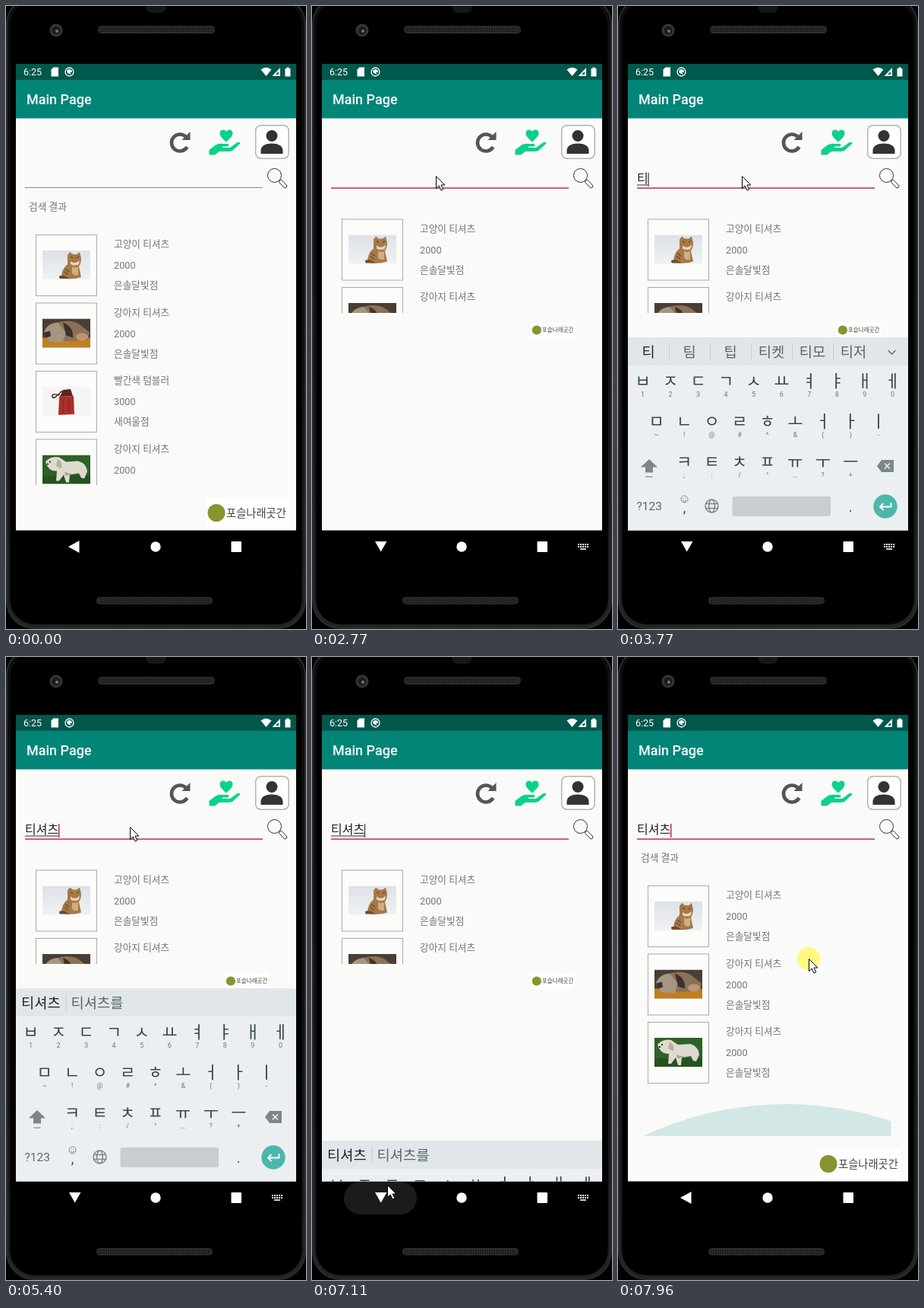
Write an HTML page that moves like this. It is 395x818 px and loops after 8000 ms.

```html
<!DOCTYPE html>
<html lang="ko">
<head>
<meta charset="utf-8">
<title>Main Page</title>
<style>
  html, body { margin: 0; width: 100%; height: 100%; overflow: hidden; background: #000; }
  svg { display: block; width: 395px; height: 818px; font-family: Roboto, "Noto Sans CJK KR", sans-serif; }
  .mid { text-anchor: middle; }
  .info { font-size: 12.7px; fill: #757575; }
  .jamo { font-size: 22px; fill: #37474f; }
  .alt { font-size: 9px; fill: #6b777d; }
  .word { font-size: 18.7px; fill: #5b666b; }
  .word.first { fill: #1f2629; }
</style>
</head>
<body>
<svg viewBox="0 0 395 818">
  <defs>
    <clipPath id="screenClip"><rect x="13" y="76" width="369" height="612.500"/></clipPath>
    <clipPath id="listClip"><rect id="listArea" x="35" y="270" width="324.5" height="359"/></clipPath>
    <clipPath id="photoClip"><rect width="63" height="38"/></clipPath>
    <pattern id="mesh" width="3" height="3" patternUnits="userSpaceOnUse">
      <rect width="3" height="3" fill="#1b1b1b"/><circle cx="1.5" cy="1.5" r=".9" fill="#3a3a3a"/>
    </pattern>
    <linearGradient id="snow" x2="0" y2="1"><stop stop-color="#dde2e7"/><stop offset="1" stop-color="#f0f1f3"/></linearGradient>
    <linearGradient id="rim" x2="0" y2="1"><stop stop-color="#0c0c0c"/><stop offset=".6" stop-color="#121212"/><stop offset="1" stop-color="#242424"/></linearGradient>
  </defs>

  <!-- phone body -->
  <rect width="395" height="818" fill="#000"/>
  <rect x="1" y="-12" width="393" height="829" rx="36" fill="url(#rim)" stroke="#2b2b2b" stroke-width="2"/>
  <rect x="5" y="-8" width="385" height="820" rx="33" fill="#000" stroke="#161616"/>
  <path d="M184 0H211Q210 9 203 9H192Q185 9 184 0Z" fill="#15161a"/>
  <circle cx="66" cy="32" r="8.5" fill="#363636"/>
  <circle cx="66" cy="32" r="5.5" fill="#1c1c1c"/>
  <circle cx="67" cy="33" r="2" fill="#777"/>
  <rect x="121.5" y="26.5" width="153" height="9" rx="4" fill="url(#mesh)" stroke="#333"/>
  <rect x="119.5" y="776.5" width="152" height="8.500" rx="4" fill="url(#mesh)" stroke="#333"/>

  <g clip-path="url(#screenClip)">
    <rect x="13" y="76" width="369" height="613" fill="#fafaf8"/>
    <rect x="13" y="76" width="369" height="21" fill="#00574b"/>
    <rect x="13" y="97" width="369" height="50.500" fill="#008577"/>
    <g fill="#fff">
      <text x="23" y="91" font-size="12.500">6:25</text>
      <path d="M62.500 80.500H69V92.500H59.500V83.500Z"/>
      <circle cx="83.500" cy="86.500" r="5.500" fill="none" stroke="#fff" stroke-width="1.300"/>
      <path d="M80 85a4 4 0 0 1 7 0v2h-3l2 3-5-2Z"/>
      <path d="M335.500 83.500Q342.500 78 349.500 83.500L342.500 92Z"/>
      <path d="M361 81V92H350.500ZM359 86V90H355Z" fill-rule="evenodd"/>
      <path d="M367.500 82H369.500V80.500H372.500V82H374.500V92.500H367.500Z"/>
      <text x="27" y="129" font-size="18" font-weight="500">Main Page</text>
    </g>

    <!-- toolbar icons -->
    <path d="M236.500 171.500A11 11 0 1 0 238.500 185" fill="none" stroke="#555" stroke-width="4.600"/>
    <path d="M242.500 165V176H231.500Z" fill="#555"/>
    <g fill="#0bd28a">
      <path d="M290 178.500C285 174 281.500 171 281.500 167 281.500 162 287.500 161 290 165 292.500 161 298.500 162 298.500 167 298.500 171 295 174 290 178.500Z"/>
      <path d="M267.500 189 276 182.500Q280 180 285 181H292Q295 182 292 184.500H285V186H295L304 179.500Q308 177.500 308.500 180.500L298 190Q296 191 292 191H281L275 195.500H267.500Z"/>
    </g>
    <rect x="328.700" y="156.700" width="43.500" height="43.500" rx="7" fill="#fff" stroke="#b3b3b3" stroke-width="1.500"/>
    <g fill="#333"><circle cx="350" cy="170.500" r="7.500"/><path d="M335.500 194V189Q337 180.500 350 180.500T364.500 189V194Z"/></g>
    <g fill="none" stroke="#333">
      <circle cx="353.500" cy="222.500" r="9"/>
      <path d="M360 229 362.500 228 370 236Q370 239 367 239L359.500 231.500Z"/>
    </g>

    <!-- search field -->
    <rect id="fieldLine" x="25" width="313"/>
    <rect id="composeLine" x="25" y="234.500" height="1" fill="#333"/>
    <text id="query" x="25" y="232" font-size="16" fill="#222"></text>
    <rect id="caret" y="219" height="18"/>

    <text id="header" class="info" x="30" y="268">검색 결과</text>
    <g clip-path="url(#listClip)">
      <g id="list"></g>
      <circle id="glow" r="442" fill="#008577"/>
    </g>

    <g id="brand">
      <rect width="107" height="38" fill="#fff"/>
      <circle cx="13" cy="18.500" r="11.500" fill="#87942f"/>
      <text x="26" y="23.500" font-size="14.300" font-weight="500" fill="#4a4541">포슬나래곳간</text>
    </g>

    <g id="keyboard">
      <rect x="13" y="435" width="369" height="254" fill="#ebeff1"/>
      <rect x="13" y="435" width="369" height="37" fill="#e1e6e9"/>
      <g id="words"></g>
      <g id="keys"></g>
      <g fill="#7c878c">
        <path d="M41 595 52 605.500H46V612.500H36V605.500H30Z"/><rect x="36.500" y="617.500" width="9" height="1.200"/>
        <path d="M341 604 347 596H363V612H347Z"/>
        <path d="M351 600.500 358 607.500M358 600.500 351 607.500" stroke="#ebeff1" stroke-width="1.600"/>
      </g>
      <text x="24.500" y="662" font-size="15.500" fill="#5b666b">?123</text>
      <g fill="none" stroke="#7c878c" stroke-width="1">
        <circle cx="87.500" cy="647.500" r="4.500"/><path d="M85 649Q87.500 652 90 649M86 646V646.800M89 646V646.800"/>
        <g stroke-width="1.500"><circle cx="123.500" cy="656.500" r="8.500"/><ellipse cx="123.500" cy="656.500" rx="3.800" ry="8.500"/><path d="M115.500 653.500H131.500M115.500 659.500H131.500"/></g>
      </g>
      <text class="mid" x="87.500" y="665" font-size="18" fill="#37474f">,</text>
      <rect x="150.500" y="644" width="129.500" height="26" rx="3" fill="#c9cdd0"/>
      <text class="mid" x="306" y="664" font-size="18" fill="#37474f">.</text>
      <circle cx="352" cy="657" r="15.700" fill="#4db6ac"/>
      <path d="M359.500 652V657.500H346M349.500 653 345 657.500 349.500 662" fill="none" stroke="#fff" stroke-width="1.800"/>
    </g>
  </g>

  <!-- navigation bar -->
  <rect id="ripple" x="42" y="689" width="96" height="43" rx="21.500" fill="#1b1b1b"/>
  <g fill="#fff">
    <path id="back"/>
    <circle cx="197" cy="710" r="6.700"/>
    <rect x="296.500" y="703" width="13.500" height="14" rx="1"/>
    <path id="imeIcon" d="M350 707H364M350 710H364" stroke="#fff" stroke-width="2" stroke-dasharray="2 1"/>
    <path id="imeBar" d="M353 713H361" stroke="#fff" stroke-width="1.600"/>
  </g>

  <circle id="press" r="15" fill="#fffa78" opacity=".95"/>
  <path id="cursor" d="M.5.500V16.500L4.200 13 7 19 9.800 17.800 7 12H11.800Z" fill="#fff" stroke="#000"/>
</svg>
<script>
const LOOP = 8000;
const $ = id => document.getElementById(id);
const set = (id, attrs) => { for (const k in attrs) $(id).setAttribute(k, attrs[k]); };
const show = (id, on) => { $(id).style.display = on ? '' : 'none'; };

// Value of the last [time, value] entry reached at t.
const at = (t, track) => track.reduce((v, [time, value]) => t >= time ? value : v, track[0][1]);
const within = (t, from, to) => t >= from && t < to;

// Products
const photos = {
  cat: `<rect width="63" height="38" fill="url(#snow)"/>
    <path d="M25 36Q25 24 33 18L33 6 36 2 40 5H45L49 2 51 10Q51 17 48 21L51 35Q39 39 25 36Z" fill="#a87848"/>
    <path d="M37 14Q43 19 49 13L48 18Q43 21 37 18Z" fill="#e6d5ba"/>
    <path d="M39 21Q43 24 47 21L47 32Q42 34 39 30Z" fill="#cfae83"/>
    <path d="M29 33Q19 32 23 37H36Z" fill="#6e4c30"/>
    <path d="M30 24 35 28M29 28 34 32M37 8 40 10M45 10 48 8" stroke="#6e4c30" stroke-width="1.500"/>`,
  dog: `<rect width="63" height="38" fill="#4a3d35"/>
    <path d="M0 25H63V38H0Z" fill="#bf7f22"/>
    <path d="M20 5Q36 0 48 7L62 18 60 28 40 29 16 30Z" fill="#8a7158"/>
    <path d="M2 18Q6 6 20 5L31 18 27 31 9 30Z" fill="#a59582"/>
    <path d="M27 5Q41 10 40 25L31 22Z" fill="#3c322c"/>
    <path d="M2 18 10 16 11 23 5 25Z" fill="#3c322c"/>
    <ellipse cx="52" cy="24" rx="8" ry="5" fill="#bd9874"/>`,
  bag: `<rect width="63" height="38" fill="#f6f5f4"/>
    <path d="M23 11Q12 8 13 13T26 5" fill="none" stroke="#4a2a24" stroke-width="1.500"/>
    <path d="M22 13 41 12 42 36 21 37Z" fill="#a83029"/>
    <path d="M23 13 27 4 37 3 40 12Z" fill="#5d2620"/>
    <path d="M27 15V35M35 15V35" stroke="#7c241f"/>`,
  pup: `<rect width="63" height="38" fill="#2f6128"/>
    <rect y="27" width="63" height="11" fill="#25521f"/>
    <path d="M4 9Q11 1 22 3L31 9 47 8Q58 11 59 22L55 31 51 30 48 24 36 26 35 36H31L28 26 22 34H18L19 21Q8 22 4 9Z" fill="#dfdacf"/>
    <path d="M20 5Q27 9 25 18L18 14Z" fill="#b9b0a0"/>
    <path d="M29 22Q40 27 48 23L36 26 30 27Z" fill="#aaa394"/>
    <path d="M9 9H11M6 12H8" stroke="#332f2a" stroke-width="2"/>`
};
const product = (photo, name, price, shop, i) => `
  <g id="row-${photo}" transform="translate(0 ${300 + i * 89.5})">
    <rect x="39.500" y=".5" width="80" height="80" fill="#fcfcfb" stroke="#aaa"/>
    <g transform="translate(48 21)" clip-path="url(#photoClip)">${photos[photo]}</g>
    <g class="info"><text x="142" y="17">${name}</text><text x="142" y="45">${price}</text><text x="142" y="71">${shop}</text></g>
  </g>`;
$('list').innerHTML = [
  ['cat', '고양이 티셔츠', 2000, '은솔달빛점'],
  ['dog', '강아지 티셔츠', 2000, '은솔달빛점'],
  ['bag', '빨간색 텀블러', 3000, '새여울점'],
  ['pup', '강아지 티셔츠', 2000, '은솔달빛점']
].map((p, i) => product(...p, i)).join('');

// Keyboard
const esc = c => c === '&' ? '&amp;' : c;
const keyRow = (x0, y, letters, alts) => [...letters].map((c, i) => {
  const x = x0 + 36.55 * i;
  return `<text class="jamo mid" x="${x}" y="${y}">${c}</text><text class="alt mid" x="${x}" y="${y + 13}">${esc(alts[i])}</text>`;
}).join('');
$('keys').innerHTML =
  keyRow(32.5, 500, 'ㅂㅈㄷㄱㅅㅛㅕㅑㅐㅔ', '1234567890') +
  keyRow(50.5, 553, 'ㅁㄴㅇㄹㅎㅗㅓㅏㅣ', '~!@#^&()-') +
  keyRow(87, 606, 'ㅋㅌㅊㅍㅠㅜㅡ', ';:/°…?+');

let shownWords;
function drawWords(words) {
  if (words === shownWords) return;
  shownWords = words;
  let x = 13, out = '';
  words.split(' ').filter(Boolean).forEach((w, i) => {
    const width = Math.max(54, w.length * 17.2 + 14);
    if (i) out += `<rect x="${x}" y="443" width="1" height="22" fill="#c8ced1"/>`;
    out += `<text class="word mid ${i ? '' : 'first'}" x="${x + width / 2}" y="460.500">${w}</text>`;
    x += width;
  });
  if (x > 330) out += '<path d="M355.500 452 360.500 457 365.500 452" fill="none" stroke="#6b777d" stroke-width="1.600"/>';
  $('words').innerHTML = out;
}

// Pointer: stepped moves that slow down, then short jumps.
function glide(t, from, to, steps, a, b) {
  const u = Math.min(1, Math.floor((t - from) / (to - from) * steps + .001) / steps);
  const e = 1 - (1 - u) ** 2.3;
  return a.map((v, i) => v + (b[i] - v) * e);
}
const FIELD = [163, 223], BACK = [99, 693];
const jumps = [
  [7100, BACK], [7180, [125, 697]], [7260, [162, 696]], [7340, [196, 668]], [7410, [211, 608]],
  [7490, [218, 556]], [7560, [220, 540]], [7720, [227, 518]], [7800, [236, 474]], [7880, [246, 428]], [7960, [251, 396]]
];
const pointer = t => t < 5940 ? glide(t, 360, 990, 8, [362, 722], FIELD)
  : t < 7100 ? glide(t, 5940, 6710, 10, FIELD, BACK) : at(t, jumps);

const PINK = '#c23a68', DARK = '#444';
const typed = [[0, ''], [3690, 'ㅌ'], [3770, '티'], [4230, '팃'], [4310, '티셔'], [4630, '티셫'], [4930, '티셔츠']];
const suggested = [
  [0, ''], [3690, 'ㅌ ㅌㅌ ㅌㅌㅌ'], [3770, '티 팀 팁 티켓 티모 티저'], [4230, '팃 팃이 팃은 팃을 팃의 팃도'],
  [4310, '티셔 티셔츠 티셔츠를'], [4630, '티셫 티셔츠'], [4930, '티셔츠 티셔츠를']
];
const caretColor = [
  [0, ''], [1220, PINK], [1860, ''], [2340, PINK], [2770, ''], [3230, PINK],
  [3690, DARK], [5400, PINK], [5940, DARK], [7640, PINK]
];
const keyboardDrop = [
  [0, 254], [2830, 160], [2890, 70], [2940, 20], [3000, 0], [6940, 20], [7010, 100], [7090, 200], [7170, 254]
];
const rippleAlpha = [[0, 0], [6790, .6], [6870, 1], [7340, .6], [7410, .3], [7490, 0]];

function draw(t) {
  const compact = within(t, 1760, 7170);
  const filtered = t >= 7170;
  const imeOpen = within(t, 2610, 7170);
  const focused = t >= 1220;

  set('fieldLine', focused ? { y: 238.3, height: 1.6, fill: PINK } : { y: 238, height: 1, fill: '#888' });
  const text = at(t, typed), textWidth = text.length * 14.72;
  $('query').textContent = text;
  set('composeLine', { width: t < 7170 ? textWidth : 0 });
  const color = at(t, caretColor);
  show('caret', color);
  set('caret', { x: 24.7 + textWidth, width: color === DARK ? 1.3 : 1.7, fill: color || PINK });

  show('header', !compact);
  set('list', { transform: `translate(0 ${compact ? -20.5 : 0})` });
  set('listArea', { height: compact ? 133 : 359 });
  show('row-bag', !filtered);
  set('row-pup', { transform: `translate(0 ${filtered ? 479 : 568.5})` });
  set('brand', { transform: compact ? 'translate(289 415.700) scale(.53)' : 'translate(264 647)' });

  const drop = at(t, keyboardDrop);
  show('keyboard', drop < 254);
  set('keyboard', { transform: `translate(0 ${drop})` });
  drawWords(at(t, suggested));

  set('back', { d: imeOpen ? 'M83 703H98.500L90.700 716.500Z' : 'M82 710 96.500 702V718Z' });
  show('imeIcon', imeOpen);
  show('imeBar', imeOpen);
  set('ripple', { opacity: at(t, rippleAlpha) });

  const [x, y] = pointer(t);
  show('cursor', t >= 360);
  set('cursor', { transform: `translate(${Math.round(x)} ${Math.round(y)})` });
  show('press', within(t, 1150, 1300) || within(t, 6790, 6940) || t >= 7640);
  set('press', { cx: x, cy: y });

  // The overscroll glow follows the upward drag.
  const pull = t >= 7640 ? (540 - y) * .295 : 0;
  show('glow', pull > 0);
  set('glow', { cx: 221, cy: 1071.5 - pull, opacity: Math.min(.155, pull * .006) });
}

const start = performance.now();
(function frame() {
  draw((performance.now() - start) % LOOP);
  requestAnimationFrame(frame);
})();
</script>
</body>
</html>
```
